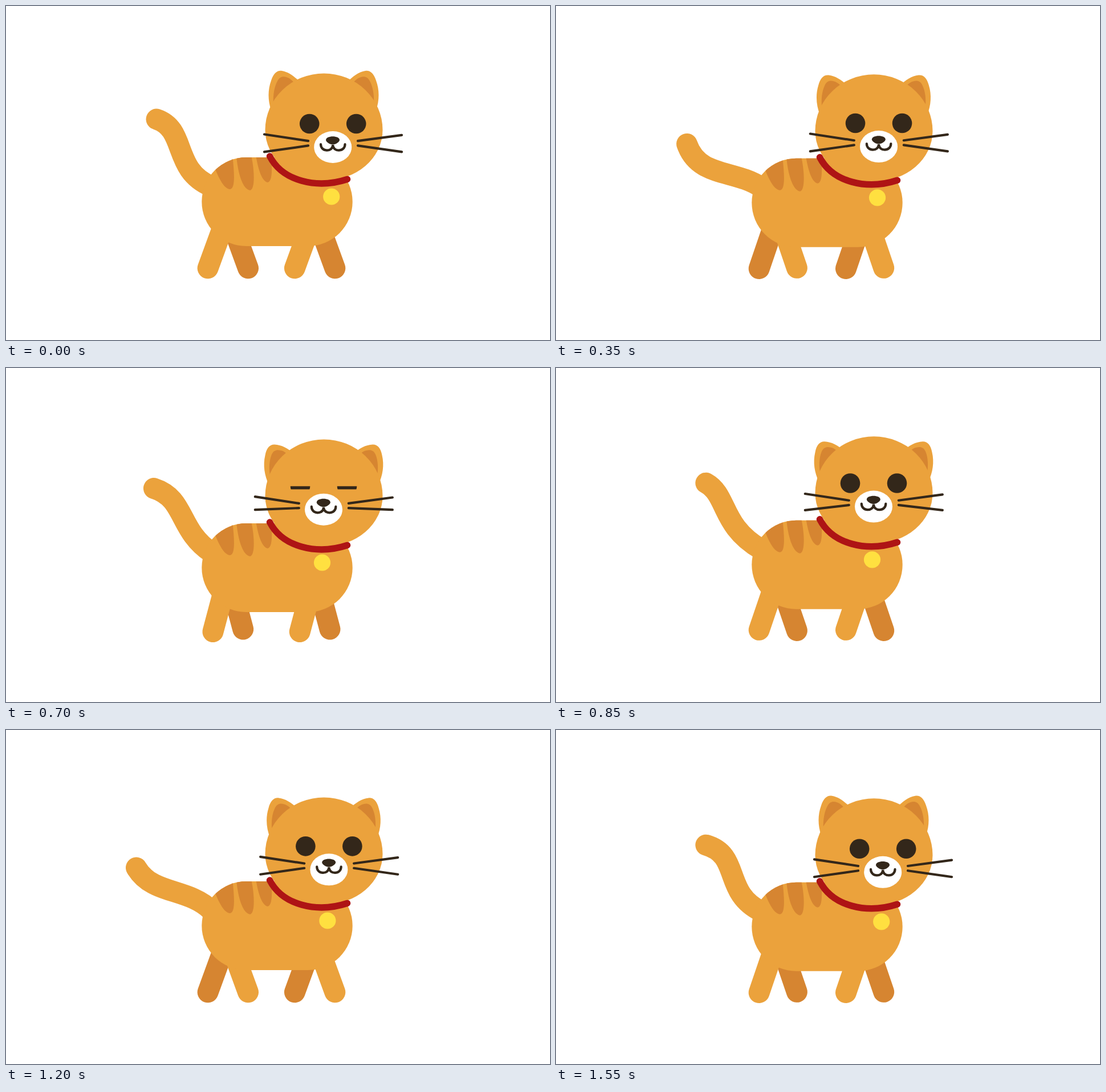
These frames come from a looping animation (954 px wide and 587 px high, 1600 ms). An HTML page:

```html
<!DOCTYPE html>
<html lang="en">
<head>
<meta charset="utf-8">
<title>Walking cat</title>
<style>
  html, body { margin: 0; width: 100%; height: 100%; overflow: hidden; background: #fff; }
  svg { display: block; width: 954px; height: 587px; }
  .fur { fill: #eba23c; }
  .shade { fill: #d68531; }
  .ink { fill: #33271a; }
  .line { fill: none; stroke: #33271a; stroke-width: 4.2; stroke-linecap: round; }
  .limb { fill: none; stroke: #eba23c; stroke-width: 37; stroke-linecap: round; }
  .far { stroke: #d68531; }
</style>
</head>
<body>
<svg viewBox="0 0 954 587">
  <defs>
    <clipPath id="torso"><rect x="343.3" y="266" width="264.4" height="156" rx="78"/></clipPath>
    <clipPath id="lids"><rect id="slit" x="500" width="150"/></clipPath>
    <g id="ear">
      <path class="fur" d="M465 183C459 166 459 147 465 131C469 118 476 112.500 484 114C496 116 506 124 516 134L510 190Z"/>
      <path class="shade" d="M469 172C468 155 471 141 476 132C480 124 486 123 493 125.500C498 127 502 131 508 138L495 180Z"/>
    </g>
  </defs>
  <path id="tail" class="limb"/>
  <path class="limb far leg" d="M0 0V103"/>
  <path class="limb far leg" d="M0 0V103"/>
  <path class="limb leg" d="M0 0V103"/>
  <path class="limb leg" d="M0 0V103"/>
  <g id="cat">
    <rect class="fur" x="343.3" y="266" width="264.4" height="156" rx="78"/>
    <g class="shade" clip-path="url(#torso)">
      <path d="M366 284C372 300 382 322 393 322C403 320 400 290 397 262H366Z"/>
      <path d="M404 262C406 290 414 322 428 324C437 322 436 290 430 262Z"/>
      <path d="M438 262C442 285 448 308 459 310C468 308 466 285 466 262Z"/>
    </g>
    <g id="earL"><use href="#ear"/></g>
    <g transform="translate(1114) scale(-1 1)"><g id="earR"><use href="#ear"/></g></g>
    <path class="fur" d="M454.500 218A103 99.500 0 0 1 660.500 218A103 89 0 0 1 454.500 218Z"/>
    <path d="M462.500 264C485 308 545 322 598.500 304.500" fill="none" stroke="#ae1415" stroke-width="11.500" stroke-linecap="round"/>
    <circle id="tag" cx="570.7" cy="335" r="14.6" fill="#ffe040"/>
    <g id="face">
      <g class="ink" clip-path="url(#lids)">
        <circle cx="532.2" cy="207" r="17.3"/>
        <circle cx="614.2" cy="207" r="17.3"/>
      </g>
      <ellipse cx="573.2" cy="248" rx="33" ry="28" fill="#fff"/>
      <path class="ink" d="M561 235.500C561 227 585 227 585 235.500C585 239 578 243.500 573 243.500C568 243.500 561 239 561 235.500Z"/>
      <path class="line" d="M552 243C552 257 573.200 257 573.200 244C573.200 257 594.500 257 594.500 243"/>
      <path id="whiskers" class="line"/>
    </g>
  </g>
</svg>
<script>
const LOOP = 1600, STEP = 50, STRIDE = 800;
const $ = id => document.getElementById(id);
const legs = [...document.querySelectorAll('.leg')];

// Cubic ease-in-out with handles .42 and .58
function ease(x) {
  if (x <= 0) return 0;
  if (x >= 1) return 1;
  let lo = 0, hi = 1, s;
  for (let i = 0; i < 24; i++) {
    s = (lo + hi) / 2;
    if (3 * (1 - s) * s * (0.42 * (1 - s) + 0.58 * s) + s ** 3 < x) lo = s; else hi = s;
  }
  return s * s * (3 - 2 * s);
}
const ramp = (t, a, b) => ease((t - a) / (b - a));
const pulse = (t, a, b, c, d) => ramp(t, a, b) - ramp(t, c, d);
const wave = (t, period) => ease(1 - Math.abs(1 - 2 * (t % period) / period));

// Tail bend over a stride: time, then the two control points
const bends = [
  [0, 318, 217, 291, 288],
  [50, 302, 222, 288, 275],
  [250, 247, 275, 295, 308],
  [350, 250, 300, 313, 285],
  [550, 280, 242, 329, 261],
  [750, 325, 218, 292, 284]
];
function bendKey(i) {
  const n = bends.length, turn = Math.floor(i / n);
  const [time, ...points] = bends[i - turn * n];
  return [time + turn * STRIDE, ...points];
}
function bendAt(t) {
  let i = bends.length - 1;
  while (bends[i][0] > t) i--;
  const [a, b, c, d] = [-1, 0, 1, 2].map(k => bendKey(i + k));
  const span = c[0] - b[0], u = (t - b[0]) / span;
  return [1, 2, 3, 4].map(k => {
    const m = span * (c[k] - a[k]) / (c[0] - a[0]);
    const n = span * (d[k] - b[k]) / (d[0] - b[0]);
    return b[k] + u * (m + u * (3 * (c[k] - b[k]) - 2 * m - n + u * (m + n - 2 * (c[k] - b[k]))));
  });
}

function draw(t) {
  const phase = t % STRIDE;
  const hop = wave(t, STRIDE / 2), swing = wave(t, STRIDE);
  const turn = pulse(t, 140, 590, 900, 1450);
  const blink = pulse(t, 400, 550, 700, 850);
  const droop = 11 - 8 * pulse(t, 400, 600, 720, 920);
  const shift = `translate(0 ${14 * hop})`;

  $('cat').setAttribute('transform', shift);
  $('tail').setAttribute('transform', shift);
  $('tail').setAttribute('d',
    `M${264 - 35.5 * swing} ${199 + 43 * swing}C${bendAt(phase).join(' ')} 360 317`);

  legs.forEach((leg, i) => {
    const near = i > 1, lifted = near === phase < STRIDE / 2;
    const angle = (near ? 20 : -20) * (1 - 2 * swing);
    const x = i % 2 ? 541.6 : 389.3, y = 364 - (lifted ? 9 * hop : 0);
    leg.setAttribute('transform', `translate(${x} ${y}) rotate(${angle})`);
  });

  for (const id of ['earL', 'earR'])
    $(id).setAttribute('transform', `translate(0 ${3 * turn}) rotate(${-7.5 * turn} 557 218)`);
  $('tag').setAttribute('transform', `translate(${-16.2 * turn})`);
  $('face').setAttribute('transform', `translate(${-16.2 * turn} ${-6.3 * turn})`);
  $('slit').setAttribute('y', 189 + 18 * blink);
  $('slit').setAttribute('height', 36 - 30.5 * blink);
  $('whiskers').setAttribute('d',
    `M453 225.500L530 237.200M453 ${245.4 + droop}L530 245.400` +
    `M694 226.800L617 237.200M694 ${245.4 + droop}L617 245.400`);
}

function tick() {
  draw(Math.floor(performance.now() % LOOP / STEP + 0.02) * STEP % LOOP);
  requestAnimationFrame(tick);
}
tick();
</script>
</body>
</html>
```
